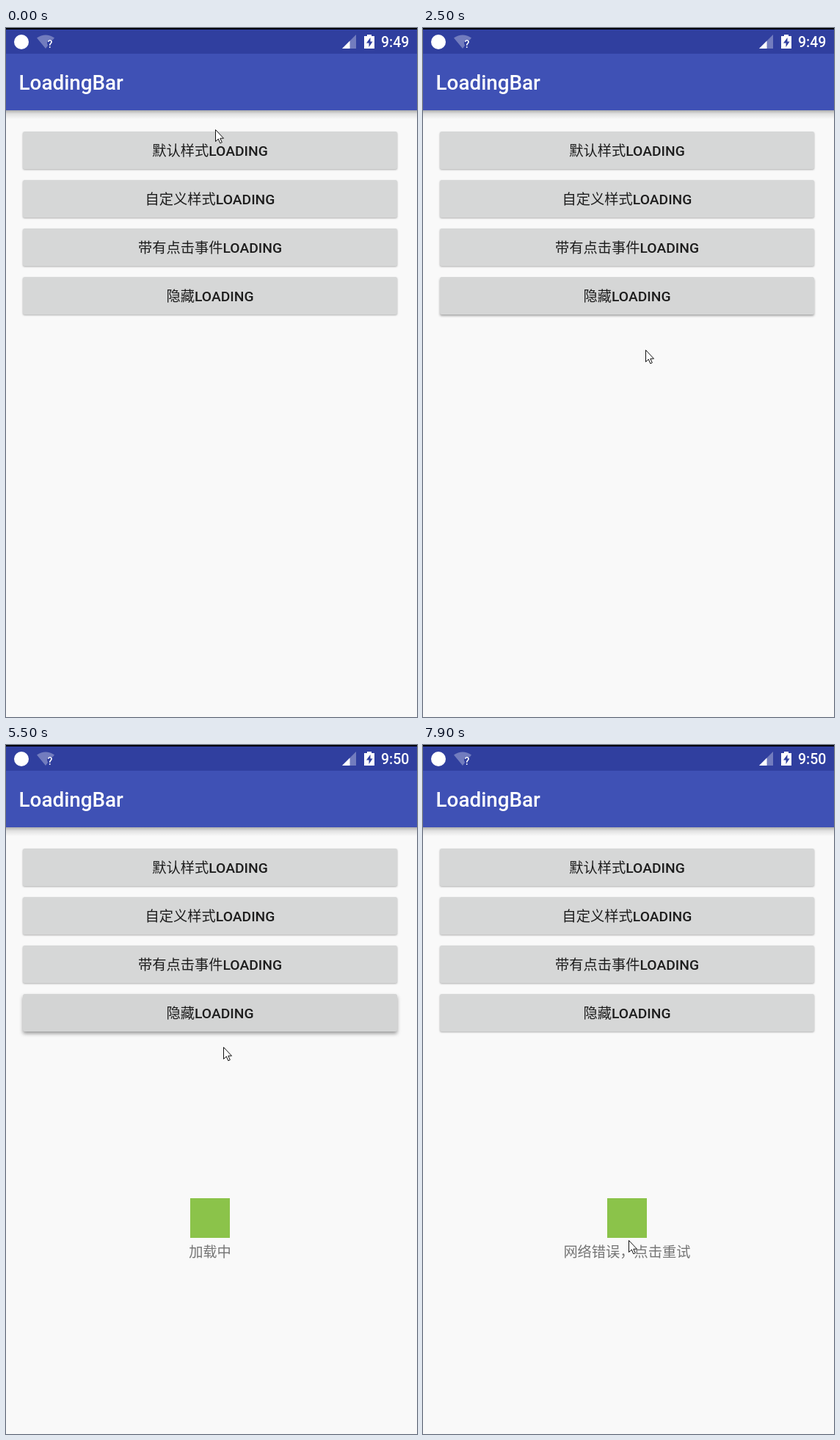
An HTML page for the animation above (8 s loop, 560 by 938 pixels).

```html
<!DOCTYPE html>
<html lang="zh-CN">
<head>
<meta charset="utf-8">
<title>LoadingBar</title>
<style>
  html, body { margin: 0; width: 100%; height: 100%; overflow: hidden; background: #f9f9f9; }
  svg { display: block; width: 560px; height: 938px; }
  text { font: 500 19.25px Roboto, sans-serif; }
  .cjk { font-family: "Noto Sans CJK SC", "Noto Sans CJK", sans-serif; font-weight: 400; }
</style>
</head>
<body>
<svg viewBox="0 0 560 938">
  <defs>
    <linearGradient id="barShadow" x2="0" y2="1">
      <stop offset="0" stop-opacity=".3"/>
      <stop offset=".4" stop-opacity=".1"/>
      <stop offset="1" stop-opacity="0"/>
    </linearGradient>
  </defs>
  <rect width="560" height="938" fill="#f9f9f9"/>
  <rect y="112" width="560" height="12" fill="url(#barShadow)"/>
  <rect y="35" width="560" height="77" fill="#3f51b5"/>
  <rect width="560" height="35" fill="#303f9f"/>
  <rect width="560" height="2"/>

  <g fill="#fff">
    <circle cx="21" cy="19" r="10"/>
    <path d="M42 13.5Q54 5.5 66 13.5L63.5 16.5Q56 14 56 21L57 24L54 28Z" opacity=".32"/>
    <text x="56.5" y="27" style="font-size:14px">?</text>
    <path d="M477 9V28H458Z" opacity=".32"/>
    <path d="M468.5 17.5V28H458Z"/>
    <path d="M492 9H498V11H502V28H488V11H492Z"/>
    <path d="M496.5 13L491 20.5H494.5V26L499.5 18.5H496.5Z" fill="#303f9f"/>
    <text id="clock" x="511" y="26" style="font-size:19.5px"></text>
    <text x="17.5" y="84" style="font-size:27.8px">LoadingBar</text>
  </g>

  <g id="buttons"></g>

  <circle id="spinner" cx="278" cy="658" r="26" pathLength="1" fill="none"
          stroke="#ff4081" stroke-width="6" stroke-linecap="square"/>
  <g id="notice">
    <rect x="251" y="617" width="54" height="54" fill="#8bc34a"/>
    <text id="message" class="cjk" x="278" y="697" text-anchor="middle" fill="#757575"></text>
  </g>
  <path id="cursor" d="M.5 .5V16.5L4.3 13L6.8 18.8L9.3 17.7L6.8 12.2H11.5Z"
        fill="#fff" stroke="#111" stroke-linejoin="round"/>
</svg>
<script>
const LOOP = 8000, STEP = 100, CLOCK_TICK = 4800;
const $ = id => document.getElementById(id);
const clamp = v => Math.max(0, Math.min(1, v));
const show = (el, on) => el.setAttribute('visibility', on ? 'visible' : 'hidden');

const [DEFAULT, CUSTOM, RETRY, HIDE] = [0, 1, 2, 3];
const labels = ['默认样式', '自定义样式', '带有点击事件', '隐藏'];
const messages = { [CUSTOM]: '加载中', [RETRY]: '网络错误，点击重试' };

$('buttons').innerHTML = labels.map((label, i) => `
  <rect class="face" x="23" y="${141 + 66 * i}" width="510" height="51" rx="2.5"/>
  <text x="278" y="${174 + 66 * i}" text-anchor="middle" fill="#1d1d1d"><tspan class="cjk">${label}</tspan>LOADING</text>`).join('');
const faces = document.querySelectorAll('.face');

const clicks = [
  { at: 682, button: DEFAULT },
  { at: 2410, button: HIDE },
  { at: 3950, button: CUSTOM },
  { at: 5510, button: HIDE },
  { at: 6950, button: RETRY }
];

// Each move slows down into its end point.
const rest = { x: 285, y: 138 };
const moves = [
  { from: 0, to: 300, x: 243, y: 173 },
  { from: 700, to: 900, x: 406, y: 557 },
  { from: 900, to: 2300, x: 292, y: 372 },
  { from: 2400, to: 2570, x: 305, y: 452 },
  { from: 3000, to: 3400, x: 286, y: 230 },
  { from: 3900, to: 4200, x: 356, y: 555 },
  { from: 4200, to: 5200, x: 292, y: 372 },
  { from: 5450, to: 5700, x: 302, y: 481 },
  { from: 6100, to: 6670, x: 284, y: 303 },
  { from: 6900, to: 7100, x: 266, y: 531 },
  { from: 7500, to: 7900, x: 280, y: 674 }
];

function cursorAt(t) {
  let { x, y } = rest;
  for (const move of moves) {
    const k = 1 - (1 - clamp((t - move.from) / (move.to - move.from))) ** 2;
    x += (move.x - x) * k;
    y += (move.y - y) * k;
  }
  return [Math.round(x), Math.round(y)];
}

// cubic-bezier(.4, 0, .2, 1)
function ease(x) {
  x = clamp(x);
  let lo = 0, hi = 1;
  for (let i = 0; i < 20; i++) {
    const u = (lo + hi) / 2, v = 1 - u;
    if (1.2 * v * v * u + 0.6 * v * u * u + u ** 3 < x) lo = u; else hi = u;
  }
  return lo * lo * (3 - 2 * lo);
}

function drawSpinner(elapsed) {
  const cycles = elapsed / 1333, phase = cycles % 1;
  const tail = 0.75 * ease(2 * phase - 1), head = 0.75 * ease(2 * phase);
  const turn = 0.25 * cycles + 0.75 * Math.floor(cycles) + elapsed * 2 / 6665 + tail;
  $('spinner').setAttribute('stroke-dasharray', `${Math.max(0.001, head - tail)} 2`);
  $('spinner').setAttribute('transform', `rotate(${turn * 360 - 90} 278 658)`);
}

function drawButtons(t) {
  faces.forEach((face, i) => {
    const lifts = clicks.filter(c => c.button === i).map(c => clamp(1 - Math.abs(t - c.at) / 150));
    const lift = Math.max(...lifts), shade = 214 - 3 * lift;
    face.style.fill = `rgb(${shade},${shade + 1},${shade + 1})`;
    face.style.filter = `drop-shadow(0 ${1 + 2.5 * lift}px ${1 + 2 * lift}px rgba(0,0,0,${0.3 + 0.08 * lift}))`;
  });
}

function draw(t) {
  const last = clicks.filter(c => c.at <= t).pop() || { at: 0, button: HIDE };
  $('clock').textContent = t < CLOCK_TICK ? '9:49' : '9:50';
  drawButtons(t);

  show($('spinner'), last.button === DEFAULT);
  drawSpinner(t - last.at);

  show($('notice'), last.button in messages);
  $('message').textContent = messages[last.button] || '';

  $('cursor').setAttribute('transform', `translate(${cursorAt(t)})`);
}

const origin = performance.now();
function tick() {
  const t = (performance.now() - origin) % LOOP;
  draw(Math.floor(t / STEP) * STEP);
  requestAnimationFrame(tick);
}
tick();
</script>
</body>
</html>
```
